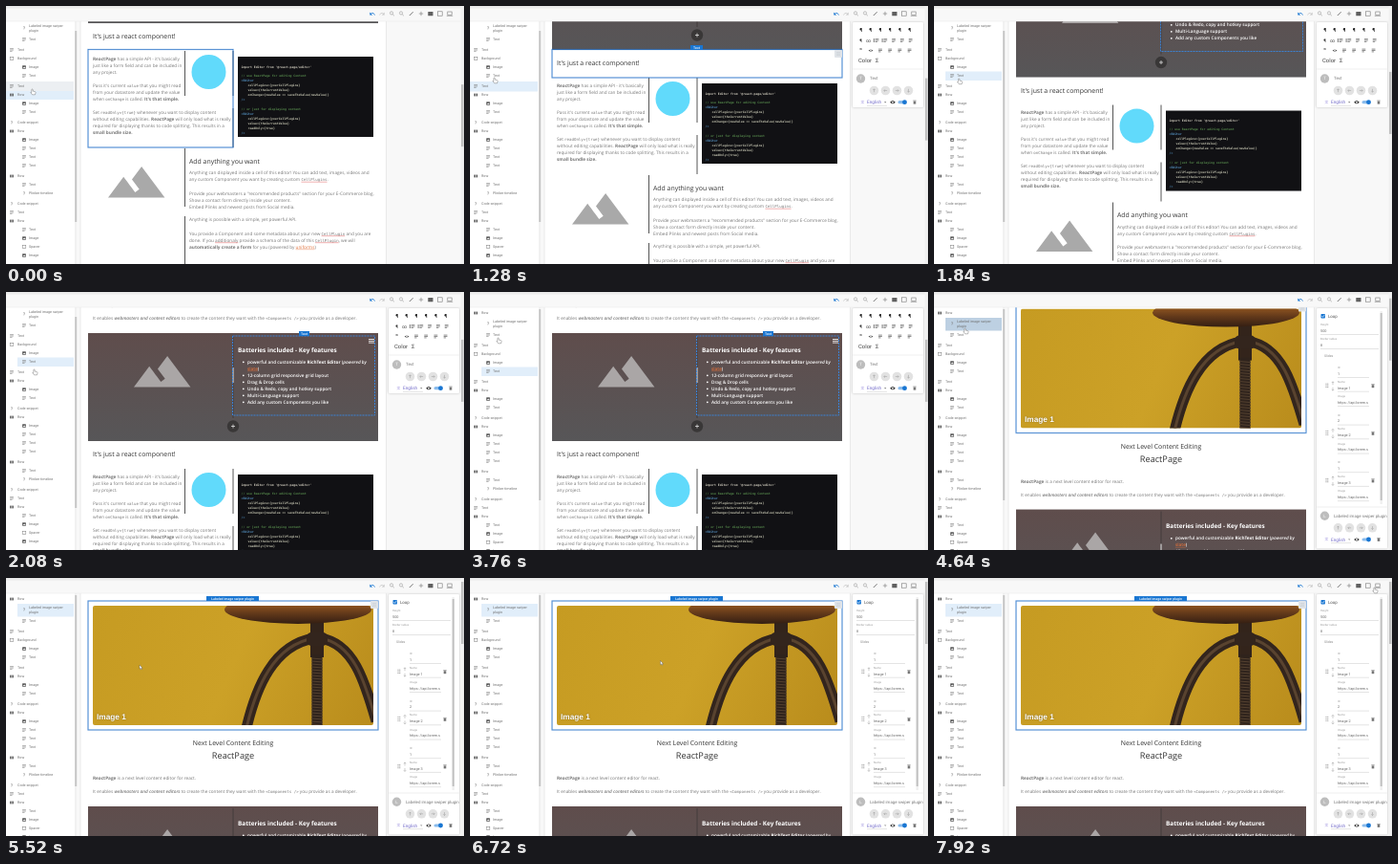
Animation, 480 px wide and 270 px high, one loop 8000 ms. Source, as an HTML page with a canvas:

```html
<!DOCTYPE html>
<html lang="en">
<head>
<meta charset="utf-8">
<title>Page editor</title>
<style>
html, body { margin: 0; width: 100%; height: 100%; overflow: hidden; background: #f8f8f8; }
canvas { display: block; width: 480px; height: 270px; }
</style>
</head>
<body>
<canvas id="stage"></canvas>
<script>
const LOOP = 8000, STEP = 80;
const SANS = '"Open Sans", "Noto Sans", sans-serif';
const UI = 'Roboto, Arial, sans-serif';
const MONO = '"DejaVu Sans Mono", "Noto Sans Mono", monospace';
const BLUE = '#1976d2';
const canvas = document.getElementById('stage');
const ctx = canvas.getContext('2d');
const dpr = Math.max(1, window.devicePixelRatio || 1);
canvas.width = 480 * dpr;
canvas.height = 270 * dpr;
if ('textRendering' in ctx) ctx.textRendering = 'geometricPrecision';

const clamp = v => Math.max(0, Math.min(1, v));
const smooth = (t, a, b) => { const p = clamp((t - a) / (b - a)); return p * p * (3 - 2 * p); };

function rect(x, y, w, h, color) {
  ctx.fillStyle = color;
  ctx.fillRect(x, y, w, h);
}
function round(x, y, w, h, r, color) {
  ctx.fillStyle = color;
  ctx.beginPath();
  ctx.roundRect(x, y, w, h, r);
  ctx.fill();
}
function dot(x, y, r, color) {
  ctx.fillStyle = color;
  ctx.beginPath();
  ctx.arc(x, y, r, 0, 7);
  ctx.fill();
}
function line(points, color, width = 0.6) {
  ctx.strokeStyle = color;
  ctx.lineWidth = width;
  ctx.beginPath();
  points.forEach(([x, y], i) => i ? ctx.lineTo(x, y) : ctx.moveTo(x, y));
  ctx.stroke();
}
function frame(x, y, w, h, color, width = 0.6) {
  ctx.strokeStyle = color;
  ctx.lineWidth = width;
  ctx.strokeRect(x, y, w, h);
}
function path(d, x, y, scale, color) {
  ctx.save();
  ctx.translate(x, y);
  ctx.scale(scale, scale);
  ctx.fillStyle = color;
  ctx.fill(new Path2D(d));
  ctx.restore();
}
// y is the visual middle of the line
function text(s, x, y, size, color, { family = UI, weight = 400, align = 'left', drop = size * 0.33 } = {}) {
  ctx.font = `${weight} ${size}px ${family}`;
  ctx.textAlign = align;
  ctx.fillStyle = color;
  ctx.fillText(s, x, y + drop);
  return ctx.measureText(s).width;
}

// *bold*  _bold italic_  `code`  ^flagged code^  #flagged#  ~link~
const MARKS = /(\*[^*]+\*|_[^_]+_|`[^`]+`|\^[^^]+\^|#[^#]+#|~[^~]+~)/;
function rich(s, x, y, color = '#777', weight = 400) {
  for (const part of s.split(MARKS)) {
    if (!part) continue;
    const mark = MARKS.test(part) ? part[0] : '';
    const body = mark ? part.slice(1, -1) : part;
    const code = mark === '`' || mark === '^';
    const style = mark === '*' ? 700 : mark === '_' ? 'italic 600' : weight;
    const ink = mark === '~' ? '#e0703a' : color;
    const w = text(body, x, y, code ? 4.1 : 4.69, ink, { family: code ? MONO : SANS, weight: style, drop: 1.6 });
    if (mark === '^' || mark === '#') line([[x, y + 2.7], [x + w, y + 2.7]], '#e06060', 0.5);
    if (mark === '~') line([[x, y + 2.7], [x + w, y + 2.7]], ink, 0.4);
    x += w;
  }
}
const block = (lines, x, y) => lines.forEach((s, i) => rich(s, x, y + i * 7));

const MOUNTAIN = 'M14 6L10.25 11L13.1 14.8L11.5 16C9.81 13.75 7 10 7 10L1 18H23Z';
const mountain = (x, y, color) => path(MOUNTAIN, x - 2.7, y - 16.2, 2.7, color);

function heading(s, x, y, size = 6.9, align = 'left', color = '#333', weight = 400) {
  text(s, x, y, size, color, { family: SANS, weight, align });
}
function tab(s, x, y, w) {
  rect(x, y, w, 5, BLUE);
  text(s, x + w / 2, y + 2.5, 3.5, '#fff', { align: 'center', weight: 500 });
}
function selection(x, y, w, h) {
  frame(x, y, w, h, 'rgba(25,118,210,.2)', 1.8);
  frame(x, y, w, h, '#2b74c8', 0.7);
}
function corner(y) {
  round(382, y, 8, 8, 1, '#dfe3e8');
  for (const i of [0, 1, 2]) line([[384, y + 2.6 + i * 1.4], [388, y + 2.6 + i * 1.4]], '#b8bfc6', 0.4);
}
function plusButton(x, y) {
  dot(x, y, 6.2, '#393737');
  line([[x - 2, y], [x + 2, y]], '#eee', 0.7);
  line([[x, y - 2], [x, y + 2]], '#eee', 0.7);
}

function curve(d, color, width) {
  ctx.strokeStyle = color;
  ctx.lineWidth = width;
  ctx.stroke(new Path2D(d));
}
function photo() {
  ctx.save();
  ctx.beginPath();
  ctx.roundRect(91, 29, 294, 125, 2);
  ctx.clip();
  const wall = ctx.createLinearGradient(91, 29, 385, 154);
  wall.addColorStop(0, '#c69b22');
  wall.addColorStop(0.5, '#cca127');
  wall.addColorStop(1, '#b98c1c');
  rect(91, 29, 294, 125, wall);
  rect(319, 43, 14, 40, '#33241b');
  rect(320.5, 80, 11, 76, '#2f231c');
  for (let y = 84; y < 154; y += 3) line([[320, y], [332, y + 1]], '#54412f', 1);
  for (const d of ['M252 157C262 115 280 70 323 63', 'M329 63C364 68 376 108 388 150']) {
    curve(d, '#33251d', 11);
    curve(d, '#59432f', 3);
  }
  round(315, 57, 22, 14, 5, '#33251d');
  const seat = ctx.createLinearGradient(0, 29, 0, 49);
  seat.addColorStop(0, '#8a5220');
  seat.addColorStop(0.4, '#63391a');
  seat.addColorStop(1, '#2f1c12');
  ctx.fillStyle = seat;
  ctx.beginPath();
  ctx.ellipse(306, 33, 77, 15, 0, 0, 7);
  ctx.fill();
  ctx.restore();
  ctx.save();
  ctx.shadowColor = 'rgba(0,0,0,.4)';
  ctx.shadowBlur = 1.5 * dpr;
  text('Image 1', 95, 145, 8.3, '#fff', { family: '"Liberation Sans", Arial, sans-serif', weight: 700 });
  ctx.restore();
}

function features(active) {
  const g = ctx.createLinearGradient(0, 239, 0, 352);
  g.addColorStop(0, '#5f4d4c');
  g.addColorStop(1, '#575658');
  rect(86, 239, 304, 113, g);
  mountain(134, 263, '#aaa6a6');
  line([[238, 241], [238, 328]], '#413a3a', 0.9);
  line([[238, 275], [238, 291]], '#eee', 1);
  heading('Batteries included - Key features', 243, 256.5, 6.4, 'left', '#fff', 700);
  const items = ['powerful and customizable *RichText Editor* (_powered by_', '~slate~)',
    '12-column grid responsive grid layout', 'Drag & Drop cells',
    'Undo & Redo, copy and hotkey support', 'Multi-Language support', 'Add any custom Components you like'];
  items.forEach((s, i) => {
    const y = 269 + i * 7;
    if (i !== 1) dot(248.8, y + 0.3, 0.9, '#fff');
    rich(s, 253, y, '#fff', 600);
  });
  plusButton(238, 336.5);
  if (!active) return;
  ctx.setLineDash([2, 1]);
  frame(237.5, 242, 149, 83, '#3788e6', 0.9);
  ctx.setLineDash([]);
  tab('Text', 307, 237, 11);
  for (const i of [0, 1, 2]) line([[380, 245.5 + i * 1.8], [386, 245.5 + i * 1.8]], '#fff', 0.8);
}

function codeShot() {
  rect(243, 387, 142, 84, '#111114');
  const rows = [
    [0, 0, "import Editor from '@react-page/editor'", '#d0ccbe'],
    [9, 0, '// use ReactPage for editing Content', '#55884b'],
    [14, 0, '<Editor', '#5593c4'],
    [19, 7, 'cellPlugins={yourCellPlugins}', '#c4c4b0'],
    [24, 7, 'value={theCurrentValue}', '#c4c4b0'],
    [29, 7, 'onChange={newValue => saveTheValue(newValue)}', '#c4c4b0'],
    [34, 0, '/>', '#5593c4'],
    [44, 0, '// or just for displaying content', '#55884b'],
    [49, 0, '<Editor', '#5593c4'],
    [54, 7, 'cellPlugins={yourCellPlugins}', '#c4c4b0'],
    [59, 7, 'value={theCurrentValue}', '#c4c4b0'],
    [64, 7, 'readOnly={true}', '#c4c4b0'],
    [69, 0, '/>', '#5593c4']
  ];
  for (const [y, x, s, color] of rows) text(s, 246.5 + x, 397.5 + y, 3.15, color, { family: MONO, weight: 700 });
}

function page(t, scroll) {
  ctx.save();
  ctx.beginPath();
  ctx.rect(76, 16, 324, 254);
  ctx.clip();
  rect(77.5, 16, 321.5, 254, '#e9e9e9');
  rect(78.5, 16, 319.5, 254, '#fff');
  ctx.translate(0, -scroll);

  photo();
  heading('Next Level Content Editing', 238, 173, 6.9, 'center');
  heading('ReactPage', 238, 186, 9.2, 'center');
  rich('*ReactPage* is a next level content editor for react.', 91, 209.4);
  rich('It enables _webmasters and content editors_ to create the content they want with the `<Components />` you provide as a developer.', 91, 223.5);
  features(t >= 1760 && t < 4160);

  heading("It's just a react component!", 91, 366);
  block(["*ReactPage* has a simple API - it's basically", 'just like a form field and can be included in', 'any project.', '',
    "Pass it's current `value` that you might read", 'from your datastore and update the value', "when `onChange` is called. *It's that simple.*", '',
    'Set `readOnly={true}` whenever you want to display content', 'without editing capabilities. *ReactPage* will only load what is really',
    'required for displaying thanks to code splitting. This results in a', '*small bundle size.*'], 91, 389);
  line([[187.5, 381], [187.5, 428]], '#555', 1);
  line([[238, 381], [238, 428]], '#555', 1);
  line([[238, 441], [238, 482]], '#555', 1);
  dot(212.5, 403, 18, '#61dafb');
  codeShot();

  mountain(107, 502, '#a9a9a9');
  line([[187.5, 483], [187.5, 544]], '#555', 1);
  line([[187.5, 554], [187.5, 606]], '#555', 1);
  heading('Add anything you want', 192, 496.6);
  block(['Anything can displayed inside a cell of this editor! You can add text, images, videos and',
    'any custom Component you want by creating custom ^CellPlugins^.'], 192, 508.5);
  block(['Provide your webmasters a "recommended products" section for your E-Commerce blog.',
    'Show a contact form directly inside your content.', 'Embed Plinks and newest posts from Social media.'], 192, 530);
  rich('Anything is possible with a simple, yet powerful API.', 192, 557.5);
  block(['You provide a Component and some metadata about your new ^CellPlugin^ and you are',
    'done. If you #additionaly# provide a schema of the data of this ^CellPlugin^, we will',
    '*automatically create a form* for you (powered by ~uniforms~)'], 192, 572);

  if (t < 160) selection(86, 379.5, 152, 102.5);
  else if (t < 1760) {
    selection(86, 351.5, 304, 29.5);
    corner(352);
    tab('Text', 231, 347, 13);
  } else if (t >= 4160) {
    selection(86, 24, 304, 135);
    corner(24);
    tab('Labeled image swiper plugin', 210, 19, 55);
    if (t < 4480) rect(307, 237, 11, 4, 'rgba(25,118,210,.3)');
  }
  ctx.restore();
}

function icon(kind, x, y, color = '#777') {
  if (kind === 'text') {
    [3.8, 3.8, 2.4].forEach((w, i) => line([[x - 1.9, y - 1.4 + i * 1.4], [x - 1.9 + w, y - 1.4 + i * 1.4]], color, 0.6));
  } else if (kind === 'row') {
    for (const i of [0, 1, 2]) rect(x - 1.9 + i * 1.35, y - 1.4, 1.1, 2.8, '#5c5c5c');
  } else if (kind === 'image') {
    round(x - 1.9, y - 1.7, 3.8, 3.4, 0.5, '#5c5c5c');
    path('M-1.4 1.1L-.5 -.1L.1 .6L.8 -.4L1.5 1.1Z', x, y, 1, '#fff');
  } else if (kind === 'frame') {
    frame(x - 1.8, y - 1.6, 3.6, 3.2, color, 0.5);
  } else {
    text('?', x, y, 5, color, { align: 'center' });
  }
}

const tree = [
  ['row', 0, 22, 'Row'], ['?', 1, 33.5, 'Labeled image swiper|plugin'], ['text', 1, 45, 'Text'],
  ['text', 0, 56, 'Text'], ['frame', 0, 65, 'Background'], ['image', 1, 74, 'Image'], ['text', 1, 83, 'Text'],
  ['text', 0, 94, 'Text'], ['row', 0, 103, 'Row'], ['image', 1, 112, 'Image'], ['text', 1, 121, 'Text'],
  ['?', 0, 132, 'Code snippet'], ['row', 0, 141, 'Row'], ['image', 1, 150, 'Image'], ['text', 1, 159, 'Text'],
  ['text', 1, 168, 'Text'], ['text', 1, 177, 'Text'], ['row', 0, 188, 'Row'], ['text', 1, 197, 'Text'],
  ['?', 1, 206, 'Plinker timeline'], ['?', 0, 217, 'Code snippet'], ['text', 0, 226, 'Text'],
  ['row', 0, 235, 'Row'], ['text', 1, 244, 'Text'], ['image', 1, 253, 'Image'], ['frame', 1, 262, 'Spacer'], ['image', 1, 271, 'Image']
];
function sidebar(t) {
  const offset = 10 * (1 - smooth(t, 3240, 3520));
  ctx.save();
  ctx.beginPath();
  ctx.rect(0, 16, 75, 254);
  ctx.clip();
  rect(0, 16, 75, 254, '#fff');
  rect(72, 16, 2.5, 254, '#f1f1f1');
  rect(72.2, 18 + offset * 0.8, 2, 200, '#c6c6c6');
  ctx.translate(0, -offset);
  if (t < 160) {
    rect(0, 89, 71, 10, '#eceff2');
    rect(0, 99, 71, 9, '#e1eefa');
  } else if (t < 1760) rect(0, 89, 71, 10.5, '#e1eefa');
  else if (t < 4160) rect(12, 78.5, 59, 9.5, '#e1eefa');
  else rect(12, 27, 59, 13.5, t < 4960 ? '#bdd0e2' : '#e1eefa');
  for (const [kind, depth, y, label] of tree) {
    icon(kind, depth ? 19 : 6, y);
    const parts = label.split('|');
    parts.forEach((s, i) => text(s, depth ? 24 : 12, y + (i - (parts.length - 1) / 2) * 5, 3.7, '#707070'));
  }
  ctx.restore();
}

function bin(x, y) {
  rect(x - 1.3, y - 1.1, 2.6, 3, '#777');
  rect(x - 1.7, y - 2, 3.4, 0.6, '#777');
}
function arrow(x, y, angle, color = '#999') {
  ctx.save();
  ctx.translate(x, y);
  ctx.rotate(angle);
  line([[0, 1.7], [0, -1.7]], color, 0.5);
  line([[-1.2, -0.5], [0, -1.7], [1.2, -0.5]], color, 0.5);
  ctx.restore();
}
function controls(y, name) {
  dot(409.5, y, 4.7, '#bdbdbd');
  text(name[0], 409.5, y, 4.5, '#fff', { align: 'center' });
  text(name, 419, y, 4.4, '#777');
  [0, -1, 1, 2].forEach((turn, i) => {
    dot(423.5 + i * 12, y + 12.5, 4.8, '#e2e2e2');
    arrow(423.5 + i * 12, y + 12.5, turn * Math.PI / 2);
  });
  const row = y + 24.7;
  text('文', 411.5, row, 3.8, '#8f82d8', { family: '"Noto Sans CJK SC", "Noto Sans CJK JP", sans-serif', align: 'center' });
  text('English', 416, row, 4.7, '#7068c8');
  path('M0 0H2.4L1.2 1.3Z', 434, row - 0.6, 1, '#888');
  line([[416, row + 3.7], [437, row + 3.7]], '#bbb', 0.4);
  path('M-2.8 0Q0 -3.2 2.8 0Q0 3.2 -2.8 0Z', 443, row, 1, '#333');
  dot(443, row, 0.9, '#fff');
  round(448.5, row - 1.6, 9, 3.2, 1.6, '#8bbcec');
  dot(455.5, row, 2.4, BLUE);
  bin(466, row);
}
function panelBox(h) {
  ctx.save();
  ctx.shadowColor = 'rgba(0,0,0,.25)';
  ctx.shadowBlur = 2.5 * dpr;
  round(401, 17, 74, h, 1, '#fff');
  ctx.restore();
}
function textPanel() {
  panelBox(89);
  for (let i = 0; i < 6; i++) text('¶', 409.5 + i * 10.2, 25, 5.6, '#222', { weight: 900, align: 'center' });
  text('¶', 409.5, 36, 5, '#333', { weight: 700, align: 'center' });
  text('∞', 417.5, 36, 5, '#444', { align: 'center' });
  for (let i = 0; i < 5; i++) {
    const x = 426.5 + i * 8.8;
    icon('text', x, 36, '#444');
    if (i < 2) line([[x - 3.2, 34], [x - 3.2, 38]], '#444', 0.7);
  }
  text('❞', 409.5, 46, 5, '#333', { align: 'center' });
  text('<>', 420, 46, 4.6, '#333', { weight: 700, align: 'center' });
  for (let i = 0; i < 4; i++) icon('text', 430 + i * 10.2, 46.5, '#444');
  text('Color', 407, 57, 5.9, '#444');
  text('Σ', 425, 57, 5.9, '#444');
  line([[401, 66], [475, 66]], '#ddd', 0.5);
  controls(76, 'Text');
}
function field(label, value, x, y, w) {
  text(label, x, y, 2.9, '#999');
  text(value, x, y + 6.6, 3.8, '#666');
  line([[x, y + 10.5], [x + w, y + 10.5]], '#bbb', 0.4);
}
function swiperPanel() {
  panelBox(251.5);
  round(405.5, 23, 4.4, 4.4, 0.7, BLUE);
  line([[406.4, 25.2], [407.4, 26.3], [409.1, 24.2]], '#fff', 0.7);
  text('Loop', 413, 25.3, 4.4, '#555');
  field('Height', '500', 405, 34, 61);
  field('Border radius', '8', 405, 49, 61);
  text('Slides', 409, 67, 3.5, '#888');
  ['1', '2', '1'].forEach((id, i) => {
    const y = 79 + i * 49.6;
    field('ID', id, 423, y, 33);
    field('Name', `Image ${i + 1}`, 423, y + 14.7, 33);
    field('Image', 'https: //api.lorem.s', 423, y + 30, 33);
    for (let k = 0; k < 6; k++) dot(411 + k % 2 * 1.8, y + 17 + Math.floor(k / 2) * 1.8, 0.5, '#777');
    arrow(418, y + 16.5, 0);
    arrow(418, y + 22.5, Math.PI);
    bin(460, y + 19.3);
  });
  rect(467.5, 20, 2.5, 202, '#f0f0f0');
  rect(467.7, 22, 2.1, 196, '#c4c4c4');
  line([[401, 225], [475, 225]], '#ddd', 0.5);
  controls(234.3, 'Labeled image swiper plugin');
}

function topBar() {
  rect(0, 0, 480, 16, '#f8f8f8');
  rect(0, 0, 480, 2.5, '#ececec');
  line([[0, 16], [480, 16]], '#e6e6e6', 0.5);
  const undo = (x, dir, color) => {
    line([[x + 2.5 * dir, 9.5], [x + 1.2 * dir, 7.6], [x - 0.6 * dir, 7.4], [x - 2 * dir, 8.6]], color, 0.8);
    path(dir > 0 ? 'M-2.7 6.4V9.4H.2Z' : 'M2.7 6.4V9.4H-.2Z', x, 0, 1, color);
  };
  undo(384, 1, BLUE);
  undo(394, -1, '#c8c8c8');
  for (const x of [404.5, 414.5]) {
    ctx.strokeStyle = '#999';
    ctx.lineWidth = 0.6;
    ctx.beginPath();
    ctx.arc(x - 0.5, 7.4, 1.6, 0, 7);
    ctx.stroke();
    line([[x + 0.7, 8.6], [x + 2.3, 10.2]], '#999', 0.7);
  }
  line([[422.8, 10], [426.6, 6.2]], '#777', 1);
  line([[432.8, 8], [437.2, 8]], '#777', 0.6);
  line([[435, 5.8], [435, 10.2]], '#777', 0.6);
  round(442.3, 6, 5.2, 4.3, 0.4, '#606060');
  frame(452.4, 5.8, 4.8, 4.4, '#777', 0.6);
  frame(462.8, 6, 4.4, 3.2, '#777', 0.6);
  line([[461.8, 10.3], [468.2, 10.3]], '#777', 0.6);
}

// time, x, y
const track = [[0, 27, 87], [720, 27, 87], [1280, 25, 75], [1760, 25, 75], [2080, 29, 81], [3040, 29, 81],
  [3760, 29, 48], [4160, 32, 38], [4960, 32, 38], [5520, 140, 91], [6080, 141, 94], [6400, 141, 94],
  [7040, 258, 79], [7200, 258, 79], [7920, 461, 10]];
function pointer(t) {
  let i = track.findIndex(k => k[0] > t);
  if (i < 0) i = track.length;
  const a = track[i - 1], b = track[i] || a;
  const p = smooth(t, a[0], b[0] + (a === b));
  const x = a[1] + (b[1] - a[1]) * p, y = a[2] + (b[2] - a[2]) * p;
  const hand = x < 72 || y < 16;
  const d = hand ? 'M.5 0Q1.2 0 1.2 .8V2.1L3.6 2.7Q4.2 3 4 3.8L3.5 5.8H.5L-1.2 3.5L-.2 3.4V.8Q-.2 0 .5 0Z'
    : 'M0 0V4.2L1 3.4L1.7 4.9L2.4 4.6L1.7 3.2H3Z';
  path(d, x, y, 1, '#fff');
  ctx.save();
  ctx.translate(x, y);
  curve(d, '#555', 0.4);
  ctx.restore();
}

function draw(t) {
  const scroll = 334 - 28 * smooth(t, 160, 640) - 110 * smooth(t, 1720, 2080) - 196 * smooth(t, 4175, 4720);
  ctx.setTransform(dpr, 0, 0, dpr, 0, 0);
  rect(0, 0, 480, 270, '#f8f8f8');
  page(t, scroll);
  sidebar(t);
  if (t >= 4160) swiperPanel();
  else if (t >= 80) {
    ctx.save();
    ctx.translate(82 * (1 - smooth(t, 80, 400)), 0);
    textPanel();
    ctx.restore();
  }
  topBar();
  rect(476.5, 0, 3.5, 270, '#f1f1f1');
  rect(477, 4 + scroll * 0.234, 2.5, 65, '#c1c1c1');
  pointer(t);
}

const start = performance.now();
function tick(now) {
  const t = Math.max(0, now - start) % LOOP;
  draw(Math.floor(t / STEP) * STEP);
  requestAnimationFrame(tick);
}
draw(0);
requestAnimationFrame(tick);
</script>
</body>
</html>
```
